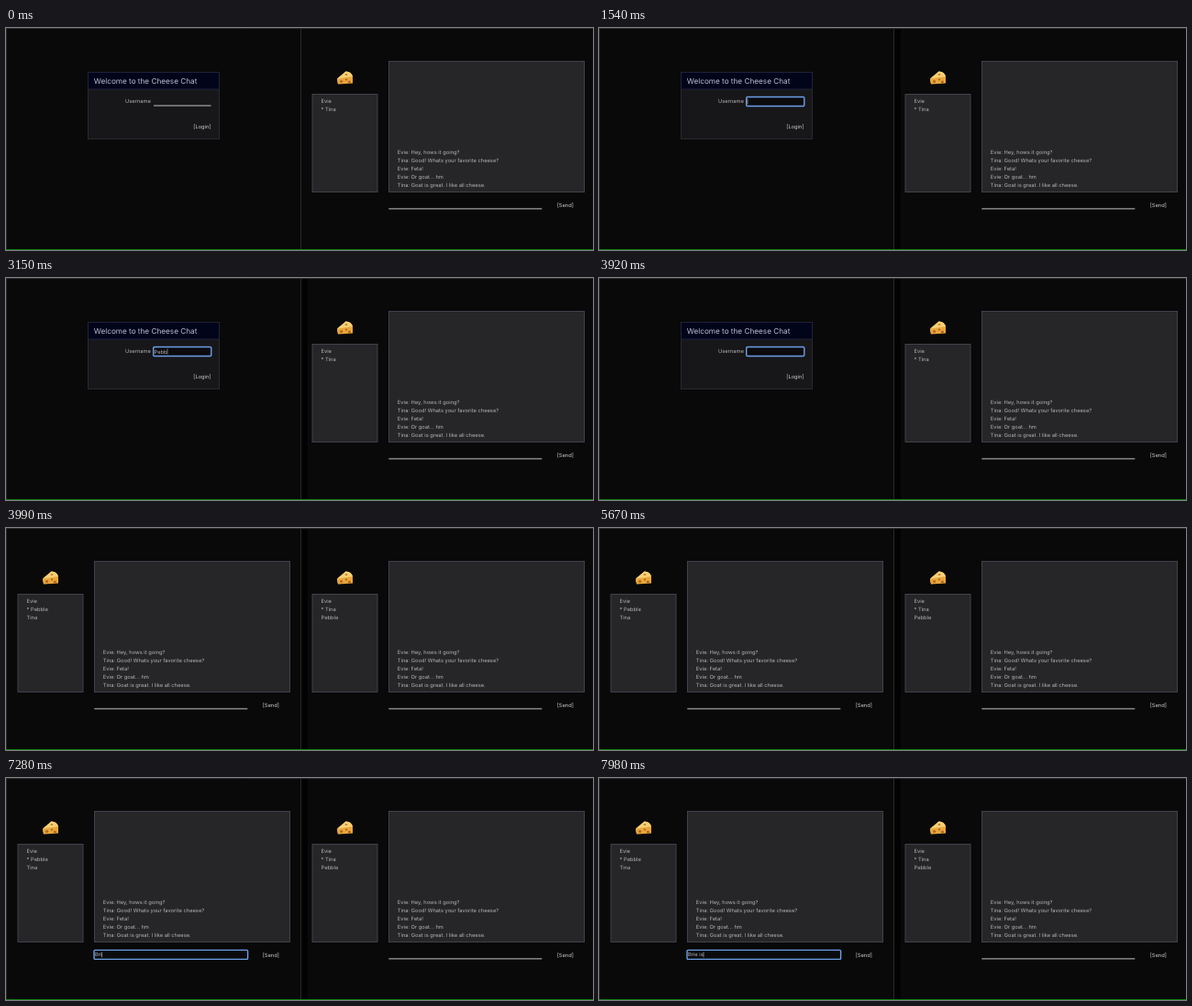
Animation, 640 px wide and 243 px high, one loop 8000 ms. Source, as an HTML page:

```html
<!DOCTYPE html>
<html>
<head>
<meta charset="utf-8">
<style>
html, body { margin: 0; width: 100%; height: 100%; overflow: hidden; background: #090909; }
svg { display: block; width: 640px; height: 243px; }
text { font: 5.75px Inter, "Open Sans", sans-serif; fill: #b4b4b6; white-space: pre; text-rendering: geometricPrecision; }
.title { font-size: 8.2px; fill: #b9bfd0; }
.button { fill: #cfcfd1; }
.panel { fill: #262628; stroke: #41414e; }
.line { stroke: #c4c4c6; }
.ring { fill: #0b0b0d; stroke: #6c9fe6; stroke-width: 1.4; }
.caret { stroke: #c8c8ca; stroke-width: .6; }
</style>
</head>
<body>
<svg id="stage" viewBox="0 0 640 243"></svg>
<script>
const people = { a: "Evie", z: "Tina", n: "Pebble" };
const { a, z, n } = people;
const talk = [
  `${a}: Hey, hows it going?`,
  `${z}: Good! Whats your favorite cheese?`,
  `${a}: Feta!`,
  `${a}: Or goat... hm`,
  `${z}: Goat is great. I like all cheese.`
];

const text = (x, y, s, cls = "") => `<text x="${x}" y="${y}" class="${cls}">${s}</text>`;
const rows = (x, y, list) => list.map((s, i) => text(x, y + 9 * i, s)).join("");

const cheese = `
  <path d="M40 55.5 L49.5 47.6 Q55.5 48 57 53 V60.4 L41 61.6 Q39.5 58 40 55.5Z" fill="#e9a63c"/>
  <path d="M40 55.5 L49.5 47.6 Q55.5 48 57 53Z" fill="#f8d277"/>
  <g fill="#a9651f">
    <ellipse cx="44.6" cy="58.6" rx="1.6" ry="1.4"/>
    <ellipse cx="50" cy="56.6" rx="1.2" ry="1"/>
    <ellipse cx="53.4" cy="59" rx="1.5" ry="1.3"/>
    <ellipse cx="50" cy="51" rx="1.5" ry=".8"/>
  </g>`;

// A focusable text input: underline at rest, ring and caret when active
const field = (id, x, y, w, h) => `
  <path class="line" d="M${x} ${y + h - .5}h${w}"/>
  <g id="${id}">
    <rect class="ring" x="${x - .3}" y="${y}" width="${w + .6}" height="${h}" rx="1.2"/>
    ${text(x + .6, y + h / 2 + 2, "")}
    <path class="caret" d="M0 ${y + 2}v${h - 4}"/>
  </g>`;

const chat = (users, id) => `
  ${cheese}
  <rect class="panel" x="13" y="72.5" width="71" height="107"/>
  <rect class="panel" x="96.5" y="36.5" width="213" height="143"/>
  ${rows(22.5, 82.2, users)}
  ${rows(105.8, 137.6, talk)}
  ${field(id, 96.3, 188.4, 167, 10)}
  ${text(279.7, 195.8, "[Send]", "button")}`;

stage.innerHTML = `
  <rect width="640" height="243" fill="#090909"/>
  <rect id="shade" x="322" width="7" height="243" fill="#020202"/>
  <path d="M0 .5H640M.5 0V243M321.5 0V243" stroke="#29292b"/>
  <g id="login">
    <rect x="89.5" y="48.5" width="143" height="73" fill="#17171a" stroke="#29292f"/>
    <rect x="89.5" y="48.5" width="143" height="18.5" fill="#02041a" stroke="#20233a"/>
    ${text(95.8, 61, "Welcome to the Cheese Chat", "title")}
    ${text(130, 82.4, "Username")}
    ${field("nameField", 161, 75.5, 62.5, 10)}
    ${text(204.3, 110, "[Login]", "button")}
  </g>
  <g id="room">${chat([a, "* " + n, z], "noteField")}</g>
  <g transform="translate(321)">
    ${chat([a, "* " + z], "idleField")}
    <g id="joined">${text(22.5, 100.2, n)}</g>
  </g>
  <rect y="242" width="640" height="1" fill="#12780f"/>`;

const show = (el, on) => el.style.display = on ? "" : "none";

// keys: the moment each letter of word is typed; cleared: when it is sent
function setField(el, t, focus, word, keys, cleared = Infinity) {
  show(el, t >= focus);
  const [label, caret] = [el.querySelector("text"), el.querySelector(".caret")];
  const count = t < cleared ? keys.filter(k => t >= k).length : 0;
  label.textContent = word.slice(0, count);
  const x = +label.getAttribute("x") + (count ? label.getComputedTextLength() : 0) + .3;
  caret.setAttribute("transform", `translate(${x})`);
  show(caret, t < focus + 490 || (t >= keys[0] && t < cleared));
}

function draw(now) {
  const t = now % 8000, inside = t >= 3990;
  show(shade, t >= 1050);
  show(login, !inside);
  show(room, inside);
  show(joined, inside);
  show(idleField, false);
  setField(nameField, t, 1540, n, [2660, 2870, 3010, 3150, 3220, 3360], 3710);
  setField(noteField, t, 5810, "Brie is", [7000, 7140, 7280, 7420, 7700, 7910, 7980]);
  requestAnimationFrame(draw);
}

const start = performance.now();
const loop = () => draw(performance.now() - start);
function tick() { loop(); }
requestAnimationFrame = (raf => () => raf(tick))(requestAnimationFrame.bind(window));
tick();
</script>
</body>
</html>
```
